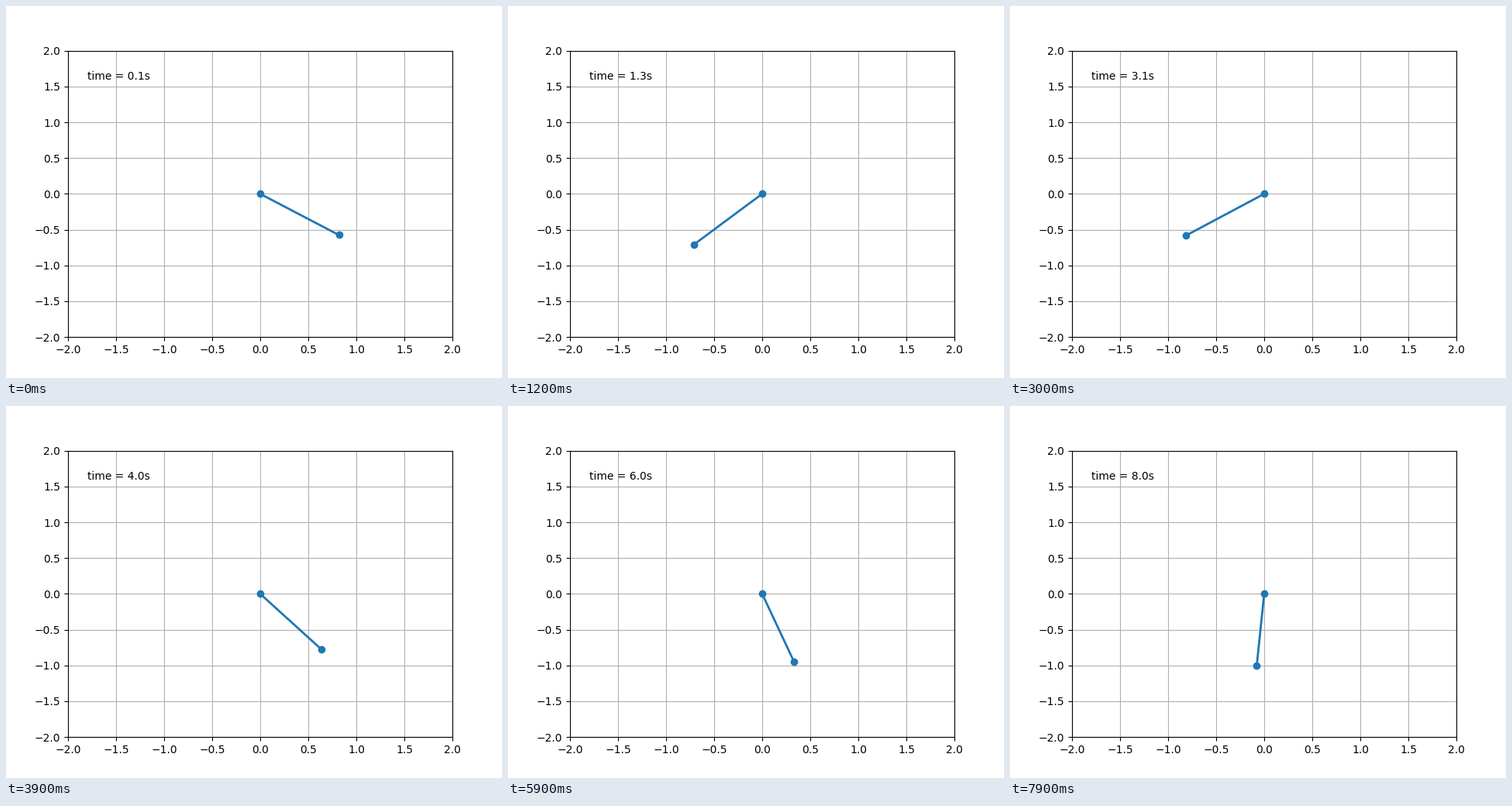
Recreate the animation shown at these times as a matplotlib script. Size 640 by 480 pixels, loop 8 s.

```python
import numpy as np
import matplotlib.pyplot as plt
from matplotlib.animation import FuncAnimation

G, LENGTH = 9.8, 1.0
START_ANGLE = 1.0
DT, FRAMES, SUBSTEPS = 0.1, 80, 20


def slope(state):
    angle, speed = state
    return np.array([speed, -G / LENGTH * np.sin(angle)])


def rk4(state, h):
    k1 = slope(state)
    k2 = slope(state + h / 2 * k1)
    k3 = slope(state + h / 2 * k2)
    k4 = slope(state + h * k3)
    return state + h / 6 * (k1 + 2 * k2 + 2 * k3 + k4)


def swing():
    """Pendulum angle after each DT, released at rest."""
    state = np.array([START_ANGLE, 0.0])
    angles = []
    for _ in range(FRAMES):
        for _ in range(SUBSTEPS):
            state = rk4(state, DT / SUBSTEPS)
        angles.append(state[0])
    return np.array(angles)


angles = swing()
xs, ys = LENGTH * np.sin(angles), -LENGTH * np.cos(angles)

fig = plt.figure(figsize=(6.4, 4.8), dpi=100)
ax = fig.add_subplot(111, autoscale_on=False, xlim=(-2, 2), ylim=(-2, 2))
ax.grid()
rod, = ax.plot([], [], "o-", lw=2)
label = ax.text(0.05, 0.9, "", transform=ax.transAxes)


def update(i):
    rod.set_data([0, xs[i]], [0, ys[i]])
    label.set_text(f"time = {(i + 1) * DT:.1f}s")
    return rod, label


anim = FuncAnimation(fig, update, frames=FRAMES, interval=1000 * DT,
                     init_func=lambda: update(0), repeat=True, repeat_delay=0)
plt.show()
```
